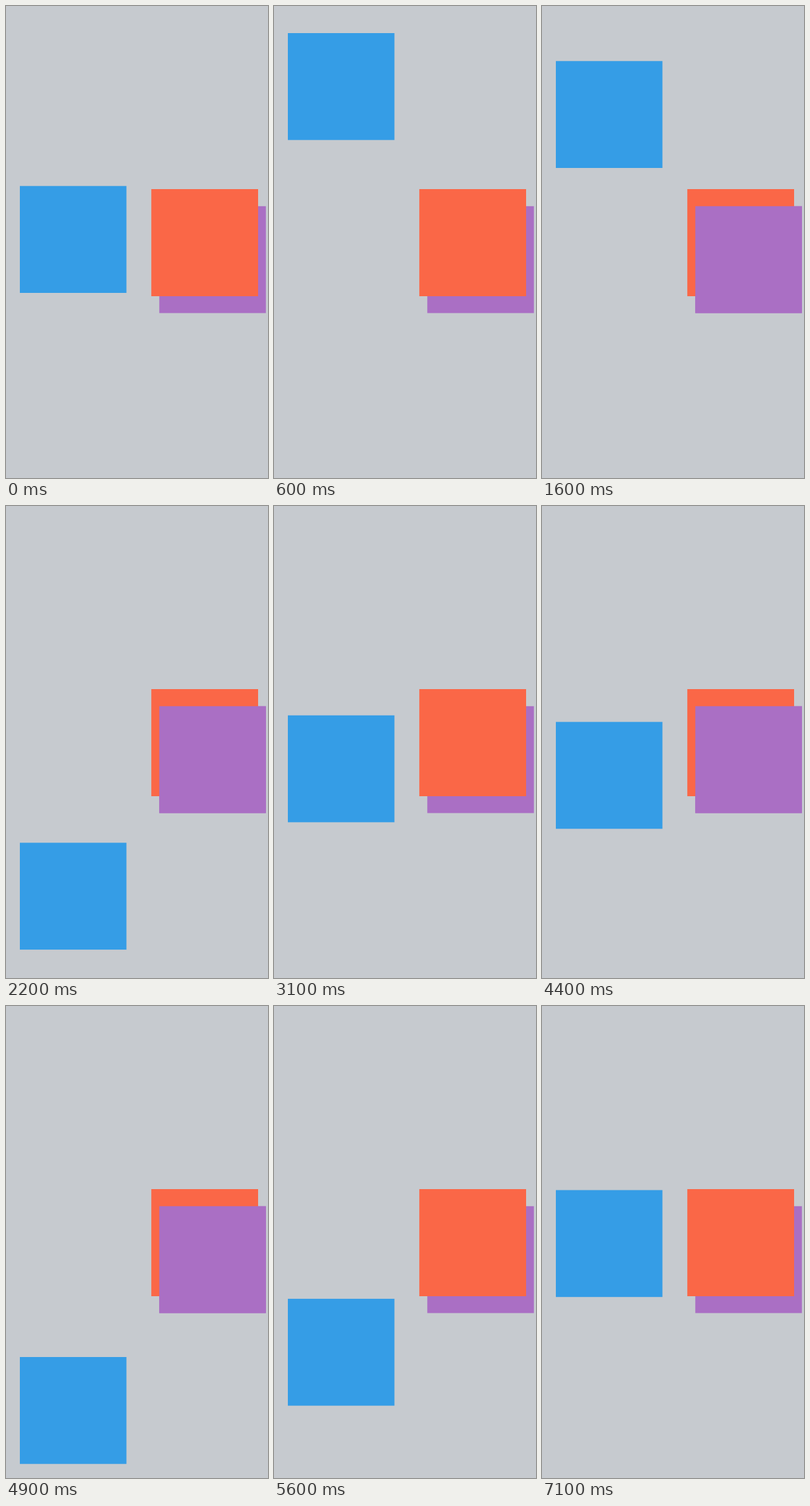
An HTML page for the animation above (7.7 s loop, 397x714 px).

```html
<!DOCTYPE html>
<html lang="en">
<head>
<meta charset="utf-8">
<title>Squares</title>
<style>
  html, body { margin: 0; width: 100%; height: 100%; overflow: hidden; background: #c6cacf; }
  svg { display: block; width: 397px; height: 714px; }
</style>
</head>
<body>
<svg viewBox="0 0 397 714">
  <rect id="blue" x="21" y="278.5" width="161.5" height="161.7" fill="#359de6"/>
  <rect id="back" x="232.3" y="302.8" width="161.5" height="161.7" fill="#aa6fc4"/>
  <rect x="220.2" y="277" width="161.8" height="162" fill="#fa6747"/>
  <use id="front" href="#back"/>
</svg>
<script>
const LOOP = 7700, STEP = 100, REST = 278.5;

// Each move eases towards `to`: progress = 1 - exp(-(elapsed / tau) ^ power)
const moves = [
  { start: -17, to: 36.5, tau: 230, power: 1.4 },
  { start: 1550, to: 523, tau: 260, power: 1.39 },
  { start: 2950, to: 39.7, tau: 228, power: 1.4 },
  { start: 4050, to: 533, tau: 374, power: 2.08 },
  { start: 5505, to: REST, tau: 206, power: 1.07 }
];

// Periods during which the purple square lies on top
const purpleOnTop = [[1000, 2500], [3800, 5100]];

const blue = document.getElementById('blue');
const front = document.getElementById('front');

function blueTop(time) {
  let top = REST;
  for (const { start, to, tau, power } of moves) {
    if (time < start) break;
    const progress = 1 - Math.exp(-(((time - start) / tau) ** power));
    top += (to - top) * progress;
  }
  return top;
}

function draw(now) {
  const time = Math.floor((now % LOOP) / STEP) * STEP;
  blue.setAttribute('y', blueTop(time).toFixed(1));
  const onTop = purpleOnTop.some(([from, until]) => time >= from && time < until);
  front.setAttribute('visibility', onTop ? 'visible' : 'hidden');
}

const begin = performance.now();
function tick() {
  draw(performance.now() - begin);
  requestAnimationFrame(tick);
}
tick();
</script>
</body>
</html>
```
